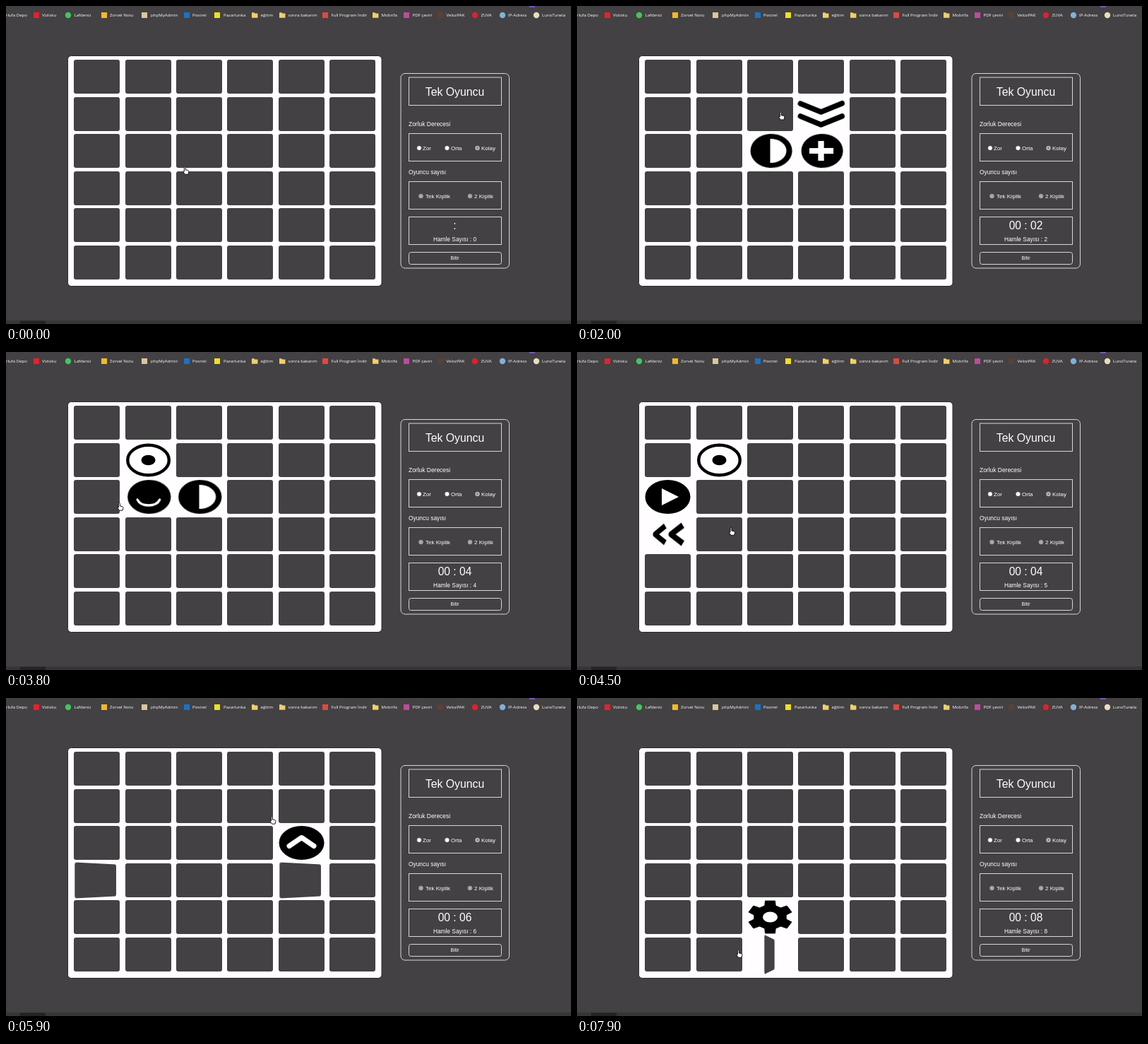
Write an HTML page that moves like this. It is 800x450 px and loops after 8000 ms.

```html
<!DOCTYPE html>
<html lang="tr">
<head>
<meta charset="utf-8">
<style>
html, body { margin: 0; width: 100%; height: 100%; overflow: hidden; background: #434143; }
#stage { position: relative; width: 800px; height: 450px; overflow: hidden; }
#stage > svg { position: absolute; left: 0; top: 0; }
.card { position: absolute; width: 65px; height: 48px; }
.back { position: absolute; inset: 0; border-radius: 3px; background: #434143; }
.card svg { position: absolute; left: 0; top: 0; overflow: visible; }
.panel { font-family: "Liberation Sans", Arial, sans-serif; fill: #fff; }
.marks { font: 6.1px "Open Sans", "Noto Sans", sans-serif; fill: #fff; }
.box { fill: none; stroke: #d8d6d8; stroke-width: 1; }
</style>
</head>
<body>
<div id="stage">
  <svg id="scene" width="800" height="450">
    <rect width="800" height="450" fill="#434143"/>
    <rect x="741" width="8" height="2" fill="#7a55c0"/>
    <rect y="445" width="800" height="5" fill="#373537"/>
    <rect x="20" y="445.5" width="36" height="4.5" fill="#252325"/>
    <g id="marks" class="marks"></g>
    <rect x="87.5" y="70.5" width="444.5" height="326" rx="5" fill="#fffdff" stroke="#2b292b"/>
    <g class="box">
      <rect x="559" y="95.5" width="153.5" height="275.5" rx="6"/>
      <rect x="570.5" y="101" width="131" height="39.5"/>
      <rect x="570.5" y="180.5" width="131" height="39"/>
      <rect x="570.5" y="248.5" width="131" height="39"/>
      <rect x="570.5" y="298.5" width="131" height="39"/>
      <rect x="570.5" y="348.5" width="131" height="17" rx="3"/>
    </g>
    <g id="panel" class="panel"></g>
  </svg>
  <div id="cards"></div>
  <svg width="800" height="450">
    <path id="hand" fill="#fff" stroke="#000" stroke-width=".9" stroke-linejoin="round"
      d="M-2.6-4.4a1 1 0 0 1 2 0V-1L2.6-.4Q4.1 0 3.9 1.6L3 5.2H-1.6L-4 1.8Q-4.4.5-3.2.6L-2.6 1.2Z"/>
  </svg>
</div>
<script>
const LOOP = 8000, STEP = 100, FLIP = 500, HOLD = 700;
const $ = id => document.getElementById(id);
const NS = 'http://www.w3.org/2000/svg';

function add(parent, tag, attrs, text = '') {
  const el = parent.appendChild(document.createElementNS(NS, tag));
  for (const key in attrs) el.setAttribute(key, attrs[key]);
  el.textContent = text;
  return el;
}

// Bookmark bar: icon kind, icon x, colour, label x, label
const bookmarks = [
  ['square', 43, '#e8202a', 51, 'Vizloku'],
  ['circle', 88, '#3ec95a', 96.5, 'Lafdeniz'],
  ['square', 139, '#f5b921', 147, 'Zorvel Notu'],
  ['square', 196, '#dcc59c', 205, 'phpMyAdmin'],
  ['square', 256, '#1673c9', 264, 'Postrel'],
  ['square', 299, '#f0e020', 308, 'Pazarlunka'],
  ['folder', 352, '#f2cf68', 360.5, 'eğitim'],
  ['folder', 391, '#f2cf68', 399.5, 'sonra bakarım'],
  ['square', 452, '#e0483e', 460.5, 'Full Program İndir'],
  ['folder', 523, '#f2cf68', 531.5, 'Mobrifa'],
  ['square', 567, '#c04a9c', 575.5, 'PDF çeviri'],
  ['square', 615, '#5c4035', 623.5, 'VelozPAK'],
  ['circle', 664, '#e0202c', 672.5, 'ZUVA'],
  ['circle', 703, '#7fb2d8', 711, 'IP-Adress'],
  ['circle', 751, '#e8dcc0', 759, 'LunoTunela']
];
add($('marks'), 'text', { x: 30, y: 15, 'text-anchor': 'end' }, 'orlufa Depo');
for (const [kind, x, fill, labelX, label] of bookmarks) {
  if (kind === 'circle') add($('marks'), 'circle', { cx: x, cy: 13, r: 4.2, fill });
  else if (kind === 'square') add($('marks'), 'rect', { x: x - 4, y: 9, width: 8, height: 8, fill });
  else add($('marks'), 'path', { d: `M${x - 4} 9.3h3.4l1 1.3h4v6.2h-8.4z`, fill });
  add($('marks'), 'text', { x: labelX, y: 15 }, label);
}

// Side panel
const label = (x, y, size, text, anchor = 'start') =>
  add($('panel'), 'text', { x, y, 'font-size': size, 'text-anchor': anchor }, text);
label(635.5, 126.5, 15.8, 'Tek Oyuncu', 'middle');
label(570, 170, 8.45, 'Zorluk Derecesi');
label(570, 238, 8.4, 'Oyuncu sayısı');
label(635.5, 359.3, 7, 'Bitir', 'middle');
const clock = label(635.5, 316, 15.6, ':', 'middle');
const moves = label(635.5, 332.5, 8.35, '', 'middle');
function radio(x, y, text, fill, textX) {
  add($('panel'), 'circle', { cx: x, cy: y, r: 3.1, fill, stroke: '#8a888a', 'stroke-width': .6 });
  label(textX, y + 3, 8, text);
}
radio(585, 201, 'Zor', '#fff', 590);
radio(624.5, 201, 'Orta', '#fff', 630);
radio(667.5, 201, 'Kolay', '#d4d2d4', 673);
add($('panel'), 'circle', { cx: 667.5, cy: 201, r: 1.8, fill: '#858385' });
radio(587.5, 269, 'Tek Kişilik', '#aaa8aa', 594);
radio(657, 269, '2 Kişilik', '#aaa8aa', 663);

// Card pictures in a 65 x 48 cell
const disc = '<ellipse cx="32.5" cy="24" rx="32" ry="24"/>';
const ring = '<ellipse cx="32.5" cy="24" rx="29.3" ry="21.3" fill="none" stroke="#000" stroke-width="4.4"/>';
const white = d => `<path d="${d}" fill="#fff"/>`;
const line = (d, width, color = '#000', cap = 'round') =>
  `<path d="${d}" fill="none" stroke="${color}" stroke-width="${width}" stroke-linecap="${cap}" stroke-linejoin="round"/>`;

function gridIcon() {
  let out = '';
  for (let i = 0; i < 9; i++)
    out += `<rect x="${.8 + i % 3 * 23.3}" y="${2.8 + (i / 3 | 0) * 15.4}" width="17.6" height="11.2"
      fill="${i === 8 ? '#000' : '#fff'}" stroke="#000" stroke-width="1.4"/>`;
  return out;
}

function gearIcon() {
  const points = [];
  for (let k = 0; k < 6; k++)
    for (const [turn, r] of [[-.34, .72], [-.22, 1], [.22, 1], [.34, .72]]) {
      const a = Math.PI * (k / 3 + .5) + turn;
      points.push([32.5 + 32 * r * Math.cos(a), 24 + 23.5 * r * Math.sin(a)].map(v => v.toFixed(1)));
    }
  return `<polygon points="${points.join(' ')}" stroke="#000" stroke-linejoin="round"/>
    <ellipse cx="32.5" cy="24" rx="10.5" ry="7.6" fill="#fff"/>`;
}

const icons = {
  half: disc + white('M32.5 7A24 17 0 0 1 32.5 41Z'),
  grid: gridIcon(),
  up: disc + white('M32.5 9.5L49 25H39.5V37.5H25.5V25H16Z'),
  plus: disc + white('M28 10h9v10h14v8H37v10h-9V28H14v-8h14z'),
  down: line('M3 9L32.5 21L62 9M3 27L32.5 39L62 27', 7.5),
  block: '<rect x="5" width="55.5" height="48.5" rx="20"/>',
  target: ring + '<ellipse cx="32.5" cy="24" rx="10" ry="7.3"/>',
  smile: disc + line('M16 28Q20 36 32.5 36T49 28', 3.4, '#fff'),
  play: disc + white('M24 12L48 24L24 36Z'),
  left: line('M28 12L9 24L28 36M57 12L38 24L57 36', 8.5, '#000', 'butt'),
  right: ring + '<path d="M13 20H31V12L49 24L31 36V28H13Z"/>',
  caret: disc + line('M15 28.5L32.5 16.5L50 28.5', 7, '#fff'),
  gear: gearIcon()
};

// Each move: first click, row, column, picture, then the same for the second click
const turns = [
  [[90, 3, 2, 'grid'], [650, 3, 3, 'up']],
  [[850, 2, 2, 'half'], [1240, 2, 3, 'plus']],
  [[1600, 1, 3, 'down'], [2130, 1, 2, 'block']],
  [[2620, 2, 2, 'half'], [3050, 2, 1, 'smile']],
  [[3350, 1, 1, 'target'], [3870, 2, 0, 'play']],
  [[4250, 3, 0, 'left'], [4920, 3, 4, 'right']],
  [[5450, 2, 4, 'caret'], [6250, 1, 3, 'down']],
  [[7250, 4, 2, 'gear'], [7770, 5, 2, 'target']]
];

const cards = [];
for (let i = 0; i < 36; i++) {
  const el = document.createElement('div');
  el.className = 'card';
  el.style.left = 96.4 + i % 6 * 72.35 + 'px';
  el.style.top = 76 + (i / 6 | 0) * 52.6 + 'px';
  el.innerHTML = '<div class="back"></div><svg width="65" height="48"></svg>';
  $('cards').append(el);
  cards.push({ el, back: el.firstChild, face: el.lastChild, flips: [] });
}
for (const [first, second] of turns)
  for (const [open, row, col, icon] of [first, second]) {
    const card = cards[row * 6 + col];
    card.flips.push([open, second[0] + HOLD]);
    card.face.innerHTML = icons[icon];
  }

// The CSS "ease" curve
function ease(x) {
  if (x <= 0) return 0;
  if (x >= 1) return 1;
  let lo = 0, hi = 1;
  for (let i = 0; i < 24; i++) {
    const s = (lo + hi) / 2;
    if (.75 * s * (1 - s) + s ** 3 < x) lo = s; else hi = s;
  }
  return .3 * lo * (1 - lo) ** 2 + 3 * lo * lo * (1 - lo) + lo ** 3;
}

function drawCard({ el, back, face, flips }, t) {
  let angle = 0;
  for (const [open, close] of flips)
    angle += 180 * (ease((t - open) / FLIP) - ease((t - close) / FLIP));
  const shown = angle > 90;
  back.style.display = shown ? 'none' : '';
  face.style.display = shown ? '' : 'none';
  const turn = shown ? angle - 180 : angle;
  el.style.transform = Math.abs(turn) > .1 ? `perspective(225px) rotateY(${turn}deg)` : 'none';
}

const handPath = [
  [0, 255, 233], [90, 258, 236], [650, 340, 254], [850, 288, 216], [1240, 342, 197],
  [1300, 344, 180], [1600, 346, 160], [2130, 280, 155], [2350, 167, 91], [2620, 262, 200],
  [2800, 204, 200], [3050, 202, 205], [3350, 198, 160], [3800, 162, 219], [3870, 148, 215],
  [4250, 128, 255], [4920, 420, 252], [5100, 427, 247], [5450, 420, 215], [5900, 378, 173],
  [6250, 346, 160], [7250, 272, 312], [7770, 262, 355], [7900, 230, 362], [8000, 230, 362]
];

function handAt(t) {
  const i = handPath.findIndex(p => p[0] > t);
  const [t0, x0, y0] = handPath[i - 1], [t1, x1, y1] = handPath[i];
  const u = (t - t0) / (t1 - t0), s = u * u * (3 - 2 * u);
  return [x0 + (x1 - x0) * s, y0 + (y1 - y0) * s];
}

function draw(now) {
  const t = Math.floor(now % LOOP / STEP) * STEP;
  for (const card of cards) drawCard(card, t);
  const seconds = Math.floor((t - 20) / 920);
  clock.textContent = seconds > 0 ? `00 : 0${seconds}` : ':';
  moves.textContent = 'Hamle Sayısı : ' + turns.filter(([, second]) => t >= second[0]).length;
  $('hand').setAttribute('transform', `translate(${handAt(t)})`);
}

const start = performance.now();
function tick() {
  draw(performance.now() - start);
  requestAnimationFrame(tick);
}
tick();
</script>
</body>
</html>
```
